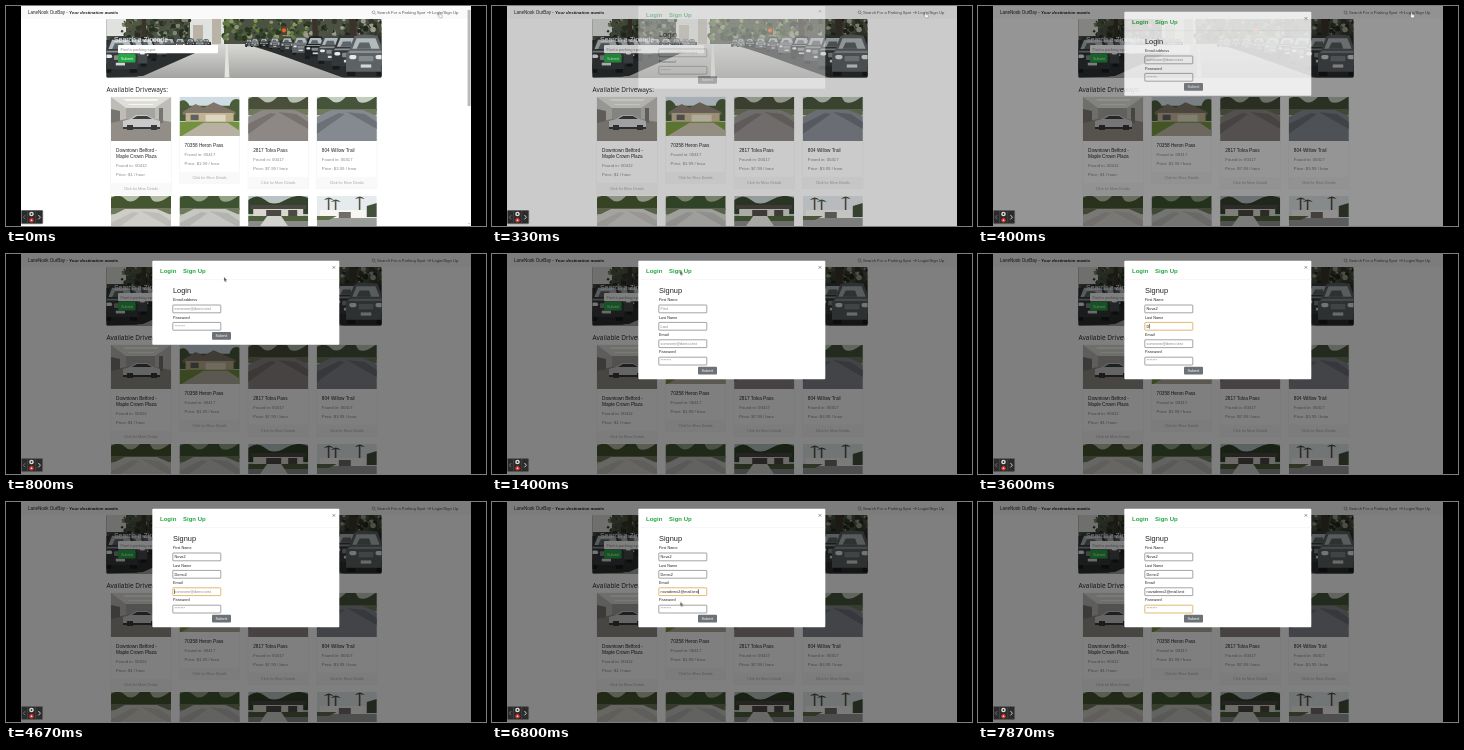
Write an HTML page that moves like this. It is 480x220 px and loops after 8000 ms.

```html
<!DOCTYPE html>
<html lang="en">
<head>
<meta charset="utf-8">
<title>Driveway sign up</title>
<style>
html, body { margin: 0; width: 100%; height: 100%; overflow: hidden; background: #000; }
svg { display: block; width: 100vw; height: 100vh; }
text { font-family: "Liberation Sans", Arial, sans-serif; fill: #222; white-space: pre; }
.soft { fill: #868686; }
.foot { fill: #a8a8a8; }
.nav { fill: #555; }
.white { fill: #fff; }
.tab { font-size: 6px; font-weight: bold; fill: #28a745; }
.label, .value { font-size: 3.8px; }
.hint { fill: #888; }
.box { fill: #fff; stroke: #666; stroke-width: .6; }
.focus .box { stroke: #dba74f; stroke-width: .8; }
.caret { fill: #111; visibility: hidden; }
#backdrop { animation: dim 8s linear infinite; }
#modal { animation: fade 8s linear infinite, drop 8s infinite; }
#cursor { animation: move 8s ease-in-out infinite; }
@keyframes dim { 0%, 3.3% { opacity: 0 } 5.36%, 100% { opacity: .5 } }
@keyframes fade { 0%, 3.3% { opacity: 0 } 5.36%, 100% { opacity: 1 } }
@keyframes drop {
  0% { transform: translateY(-18.7px) }
  3.3% { transform: translateY(-18.7px); animation-timing-function: ease-out }
  5.4%, 100% { transform: none }
}
@keyframes move {
  0%, 5% { transform: translate(433px, 6.2px) }
  10% { transform: translate(218px, 23px) }
  13.3%, 17% { transform: translate(188px, 16px) }
  23%, 36% { transform: translate(190px, 55px) }
  41%, 55% { transform: translate(190px, 72px) }
  58%, 77.5% { transform: translate(190px, 90px) }
  80% { transform: translate(198px, 93px) }
  84.5%, 100% { transform: translate(188.3px, 99.8px) }
}
</style>
</head>
<body>
<svg viewBox="0 0 480 220">
  <defs>
    <clipPath id="heroClip"><rect x="100.5" y="13" width="275" height="58.5" rx="1"/></clipPath>
    <clipPath id="photoClip"><rect width="60" height="44"/></clipPath>
    <clipPath id="screenClip"><rect x="15" width="450" height="220"/></clipPath>
    <linearGradient id="road" x1="0" y1="0" x2="0" y2="1">
      <stop offset="0" stop-color="#d9d9d6"/><stop offset="1" stop-color="#a3a3a1"/>
    </linearGradient>
  </defs>
  <g clip-path="url(#screenClip)">
    <rect x="15" width="450" height="220" fill="#fff"/>
    <rect x="15" width="450" height="13" fill="#fafafa"/>
    <text x="22" y="8.3" font-size="4.5">LaneNook OurBay - <tspan font-weight="bold" font-style="italic" font-size="4.4">Your destination awaits</tspan></text>
    <circle cx="367.5" cy="6.3" r="1.4" fill="none" stroke="#777" stroke-width=".6"/>
    <path d="M368.6 7.4l1.4 1.4M421 6.6h3.6m-1.4-1.5l1.5 1.5-1.5 1.5" fill="none" stroke="#777" stroke-width=".6"/>
    <text class="nav" x="371" y="8" font-size="4.1">Search For a Parking Spot</text>
    <text class="nav" x="426" y="8" font-size="4.2">Login/Sign Up</text>
    <g clip-path="url(#heroClip)">
      <path fill="#4b5143" d="M100 13h276v59H100z"/>
      <path fill="#dfe2de" d="M100 13h20v17h-20zM184 13h34v27h-34z"/>
      <path fill="#b9b3a5" d="M187 19h10v22h-10zM206 13h9v28h-9z"/>
      <g id="leaves"></g>
      <path fill="#3a322b" d="M306 13h5l2 25h-6zM343 13h7l1 20h-7zM136 13h4v24h-5z"/>
      <path fill="url(#road)" d="M204 38h35l112 34H128z"/>
      <path fill="#e3e3e0" d="M220 38h1.5l2 34h-5z"/>
      <path fill="#2b2e2f" d="M100 34l105 2v4l-68 30-37 2zM238 36l138-6v42h-38z"/>
      <g id="cars"></g>
      <path fill="#55402f" d="M275 20h6v9h-6z"/>
      <circle cx="278" cy="24.3" r="2.1" fill="#e5622b"/>
    </g>
    <text class="white" x="108" y="36" font-size="6.9">Search a Zipcode</text>
    <rect x="112" y="39" width="100" height="8.3" rx="1" fill="#fff"/>
    <text class="hint" x="114.5" y="44.6" font-size="4.1">Find a parking spot</text>
    <rect x="112" y="48" width="17.5" height="8.5" rx="1" fill="#28a745"/>
    <text class="white" x="120.8" y="53.5" font-size="3.8" text-anchor="middle">Submit</text>
    <text x="100.5" y="86.4" font-size="6.5" style="font-family:'Open Sans',sans-serif">Available Driveways:</text>
    <g id="cards"></g>
    <path id="scrollbar" fill="#b9b9b9" d="M461.6 4h3v96h-3zM462 217h2.2l-1.1 1.6z"/>
    <rect id="backdrop" x="15" width="450" height="220"/>
    <g id="modal">
      <rect id="panel" x="146.3" y="6.8" width="187" height="84" rx="1" fill="#fff"/>
      <path d="M146.3 25.6h187" stroke="#eee" stroke-width=".5"/>
      <text class="tab" x="154" y="18.8">Login</text>
      <text class="tab" x="177" y="18.8">Sign Up</text>
      <path d="M326.7 12.2l2.4 2.4m0-2.4l-2.4 2.4" stroke="#555" stroke-width=".6"/>
      <g id="login"></g>
      <g id="signup"></g>
    </g>
    <rect x="15.3" y="204.3" width="21.5" height="13.5" rx="1" fill="#2b2b2b" stroke="#777" stroke-width=".6"/>
    <path d="M21.5 205v12.4M29.7 205v12.4" stroke="#555" stroke-width=".5"/>
    <path d="M19.2 209.2l-1.8 2 1.8 2" fill="none" stroke="#888" stroke-width=".7"/>
    <path d="M32.4 209l2 2.2-2 2.2" fill="none" stroke="#eee" stroke-width=".8"/>
    <circle cx="25.5" cy="208" r="2.3" fill="#ddd"/><circle cx="25.5" cy="208" r=".9" fill="#333"/>
    <circle cx="25.5" cy="214.2" r="2.2" fill="#d8342c"/><circle cx="25.5" cy="214.2" r=".8" fill="#fff"/>
    <g id="cursor">
      <path id="arrow" d="M0 0v4.4l1-.9.7 1.6.8-.3-.7-1.6h1.4z" fill="#555" stroke="#ccc" stroke-width=".3"/>
      <path id="hand" d="M0 0c.8-.3 1 .3 1 .8v1.4l2 .5c.5.2.5.6.4 1.1l-.4 1.7H.6L-.9 3.6c.1-.6.6-.5.9-.2z" fill="#fff" stroke="#666" stroke-width=".4"/>
      <path id="beam" d="M-.9 0h1.8M0 0v4.4M-.9 4.4h1.8" fill="none" stroke="#555" stroke-width=".5"/>
    </g>
  </g>
</svg>
<script>
const LOOP = 8000;
const $ = id => document.getElementById(id);
const rect = (x, y, w, h, fill, rx = 0) =>
  `<rect x="${x}" y="${y}" width="${w}" height="${h}" fill="${fill}" rx="${rx}"/>`;
const path = (fill, d) => `<path fill="${fill}" d="${d}"/>`;
const text = (x, y, size, body, attrs = '') =>
  `<text x="${x}" y="${y}" font-size="${size}" ${attrs}>${body}</text>`;

let seed = 7;
const rand = () => (seed = seed * 16807 % 2147483647) / 2147483647;

// Foliage: blobs scattered over a band
function foliage(x, y, w, h, n, colors) {
  let out = '';
  for (let i = 0; i < n; i++) {
    const cx = x + rand() * w, cy = y + rand() * h, r = .7 + rand() * 2.2;
    out += `<circle cx="${cx.toFixed(1)}" cy="${cy.toFixed(1)}" r="${r.toFixed(1)}" fill="${colors[i % colors.length]}"/>`;
  }
  return out;
}

// Parked car seen from the front, in a 40 x 40 box
function car(x, y, s, body) {
  return `<g transform="translate(${x} ${y}) scale(${s})">`
    + path('#17191b', 'M2 30h8v10H2zM30 30h8v10h-8z')
    + path(body, 'M9 2Q20-1 31 2l5 13 3 4v17H1V19l3-4z')
    + path('#b3babb', 'M11 4h18l4 10H7z') + path('#5c6567', 'M14 8h9l2 6H11z')
    + path('#8c9293', 'M5 16h30l2 2H3z')
    + rect(4, 20, 7, 4, '#e8eaea', 2) + rect(29, 20, 7, 4, '#e8eaea', 2)
    + rect(13, 21, 14, 5, '#85898a', 1) + rect(15, 29, 10, 3, '#d5d7d5') + '</g>';
}

// Row of cars from the far end of the street to the near one
function parked(n, x, span, y, drop, near) {
  const paints = ['#34383a', '#5d6264', '#1f2224', '#44494b'];
  let out = '';
  for (let i = 0; i < n; i++) {
    const k = i / (n - 1);
    out += car(x + span * k ** 1.3, y + drop * k, .2 + (near - .2) * k * k, paints[i % 4]);
  }
  return out;
}

$('leaves').innerHTML =
  foliage(116, 13, 68, 20, 130, ['#39412f', '#4f5941', '#262d21', '#7f8772', '#2f3729'])
  + foliage(218, 13, 84, 20, 150, ['#46592f', '#637a41', '#33452a', '#8c9867', '#283522'])
  + foliage(300, 13, 76, 17, 120, ['#33382b', '#4c533e', '#22271e', '#9a9c8b', '#3a4031']);
$('cars').innerHTML = parked(9, 196, -100, 33, -3, .92) + parked(10, 239, 100, 33, -5, 1.05);

// Wide paved yard below a strip of trees
const drive = (sky, bush, road, shade) =>
  rect(0, 0, 60, 44, sky) + path(bush, 'M0 2Q8-3 14 3t14-2 12 1 20-3v15H0z')
  + path('#6f7a5c', 'M0 12h60v6H0z') + path(road, 'M14 13h32l14 6v25H0V20z')
  + path(shade, 'M30 15l18 2 12 8v7zM0 27l22-11 6 1L0 37z');

const photos = [
  rect(0, 0, 60, 44, '#bdbcb7') + path('#dedfda', 'M0 0h60L44 11H15z')
    + path('#f6f6ee', 'M12 2h36l-2 2H15zM17 7h26l-1 1H18z') + rect(15, 11, 29, 12, '#a5a49f')
    + path('#928d86', 'M0 25l15-3h29l16 3v19H0z') + path('#777570', 'M0 12l9 2v10l-9 2zM48 11h4v15h-4z')
    + path('#c9cac9', 'M12 24l7-2 6-4h11l7 4 6 2v7H12z') + path('#3b4043', 'M21 22l5-3h10l5 3z')
    + path('#38393a', 'M12 30h37v2H12zM16 28h6v5h-6zM40 28h6v5h-6z'),
  rect(0, 0, 60, 44, '#cfdce3') + path('#4b5d38', 'M0 5Q6 1 10 10h40Q52 0 60 3v24H0z')
    + path('#80766a', 'M3 17L16 8l8 4 10-6 22 11v3H3z') + rect(6, 18, 48, 11, '#c1b391')
    + rect(26, 20, 20, 10, '#ddd5c0') + rect(11, 20, 8, 6, '#5c6260')
    + path('#73913f', 'M0 28h60v16H0z') + path('#b8b1a3', 'M24 29h24l12 9v6H2z'),
  drive('#b6bfae', '#4a4f3c', '#8d8886', '#77726f'),
  drive('#c5ccc0', '#47543c', '#858a91', '#6c7178'),
  drive('#b3bba6', '#44552f', '#cfcdc8', '#bfbdb8'),
  drive('#95a286', '#3e5430', '#c6c6c3', '#b3b3b0'),
  rect(0, 0, 60, 44, '#b9c3c4') + path('#33422b', 'M0 4q9-7 17 0t20 0 23-2v16H0z')
    + path('#d9d7d0', 'M5 13h50v8H5z') + path('#4c4945', 'M2 9h56v4H2zM18 14h15v7H18zM40 14h9v7h-9z')
    + path('#4d5f3b', 'M0 20h60v6H0z') + path('#8a8b89', 'M0 25h60v19H0z')
    + path('#d2d2ce', 'M19 20h14l16 24H2z'),
  rect(0, 0, 60, 44, '#e6ebee') + path('#5a5348', 'M11 3h1.6v19H11zM18 5h1.6v17H18zM42 2h1.6v20H42z')
    + path('#44513a', 'M7 4q5-5 10 0l-5-1zM14 6q5-5 10 0l-5-1zM38 3q5-5 10 0l-5-1zM50 10l10-3v14H50z')
    + path('#f7f6f2', 'M3 14h46v8H3z') + path('#6f6d68', 'M22 16h12v6H22z')
    + path('#9b9d9b', 'M0 22h60v22H0z') + path('#5d6d4a', 'M0 20h20l-8 4H0z')
];

const spots = [
  { lines: ['Downtown Belford -', 'Maple Crown Plaza'], zip: '00412', price: '$1', pic: 44, gap: 6 },
  { lines: ['70358 Heron Pass'], zip: '00417', price: '$1.99', pic: 39, gap: 0 },
  { lines: ['2817 Tolva Pass'], zip: '00417', price: '$7.99', pic: 44, gap: 0 },
  { lines: ['804 Willow Trail'], zip: '00417', price: '$3.99', pic: 44, gap: 0 }
];
const photo = (i, y, h = 44) =>
  `<g transform="translate(0 ${y}) scale(1 ${h / 44})" clip-path="url(#photoClip)">${photos[i]}</g>`;

$('cards').innerHTML = spots.map((s, i) => {
  const base = 91 + s.pic + 10.8, low = base + s.gap, foot = low + 25;
  return `<g transform="translate(${105 + i * 68.6} 0)">`
    + `<rect x="-.2" y="91" width="60.4" height="${foot - 79}" fill="#fff" stroke="#ebebeb" stroke-width=".4"/>`
    + photo(i, 91, s.pic)
    + s.lines.map((l, k) => text(5, base + k * 6, 4.7, l)).join('')
    + text(5, low + 8.7, 4.25, 'Found in: ' + s.zip, 'class="soft"')
    + text(5, low + 18.5, 4.25, `Price: ${s.price} / hour`, 'class="soft"')
    + rect(0, foot, 60, 12, '#f9f9f9')
    + text(30, foot + 7.3, 3.6, 'Click for More Details', 'class="foot" text-anchor="middle"')
    + photo(i + 4, 190) + '</g>';
}).join('');

const field = (label, hint, i) => `<g transform="translate(0 ${i * 17.4})">`
  + text(167, 47.3, 3.8, label, 'class="label"')
  + '<rect class="box" x="166.8" y="51" width="48" height="7.8" rx=".6"/>'
  + `<text class="value hint" x="168.6" y="56.2">${hint}</text>`
  + '<rect class="caret" x="168" y="52.4" width=".5" height="4.8"/></g>';
const form = (title, rows, y) => text(167, 39.3, 7.4, title)
  + rows.map((r, i) => field(...r, i)).join('')
  + rect(206, y, 19, 7.8, '#6c7176', 1)
  + text(215.5, y + 5.2, 3.8, 'Submit', 'class="white" text-anchor="middle"');

const mail = ['someone@demo.test', 'novademo2@mail.test'];
const secret = ['Password', '*******'];
$('login').innerHTML = form('Login', [['Email address', mail[0]], secret], 78);
$('signup').innerHTML = form('Signup',
  [['First Name', 'First'], ['Last Name', 'Last'], ['Email', mail[0]], secret], 112.8);

// keys: [time, characters shown]
const entries = [
  { from: 1930, to: 3300, value: 'Nova2', hint: 'First',
    keys: [[2130, 1], [2270, 2], [2400, 3], [2500, 4], [2800, 5]] },
  { from: 3300, to: 4470, value: 'Demo2', hint: 'Last',
    keys: [[3530, 1], [3670, 2], [3800, 3], [3930, 4], [4270, 5]] },
  { from: 4470, to: 7370, value: mail[1], hint: mail[0],
    keys: [[5000, 5], [5070, 10], [5200, 14], [5400, 15], [5530, 16], [5670, 17], [5730, 19]] },
  { from: 7370, to: LOOP, value: '', hint: secret[1], keys: [] }
];
document.querySelectorAll('#signup > g').forEach((g, i) => {
  Object.assign(entries[i], { g, out: g.querySelector('.value'), caret: g.querySelector('.caret') });
});

const show = (el, on) => { el.style.visibility = on ? 'visible' : 'hidden'; };
const within = (t, spans) => spans.some(([a, b]) => t >= a && t < b);

function draw(t) {
  const joined = t >= 1200;
  $('login').style.display = joined ? 'none' : '';
  $('signup').style.display = joined ? '' : 'none';
  $('panel').setAttribute('height', joined ? 118.4 : 84);
  show($('scrollbar'), t < 270);
  for (const e of entries) {
    const active = t >= e.from && t < e.to;
    const past = e.keys.filter(k => k[0] <= t);
    const [last, count] = past.length ? past[past.length - 1] : [e.from, 0];
    e.out.textContent = count ? e.value.slice(0, count) : e.hint;
    e.out.classList.toggle('hint', !count);
    e.g.classList.toggle('focus', active);
    const blink = active && (t - last) % 1000 < 500;
    show(e.caret, blink);
    if (blink) e.caret.setAttribute('x', 168.3 + (count ? e.out.getComputedTextLength() + .3 : 0));
  }
  show($('hand'), within(t, [[0, 430], [1000, 1400]]));
  show($('arrow'), within(t, [[430, 1000], [1400, 1750], [6200, 6930]]));
  show($('beam'), within(t, [[1750, 2000], [2870, 3400], [4400, 4600], [6930, 7070]]));
}

let start;
function tick(now) {
  start ??= now;
  draw((now - start) % LOOP);
  requestAnimationFrame(tick);
}
draw(0);
requestAnimationFrame(tick);
</script>
</body>
</html>
```
